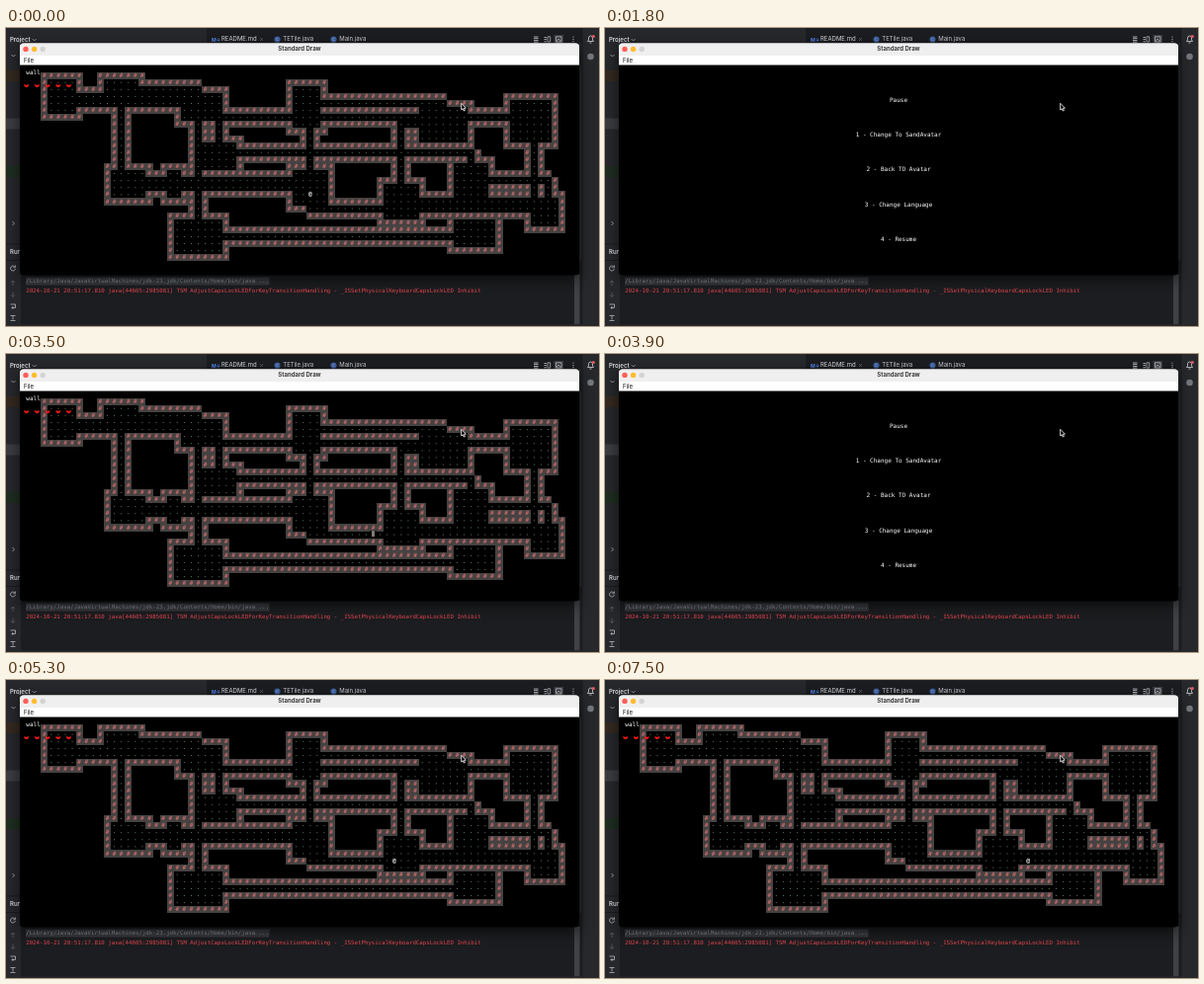
Write an HTML page with a canvas that moves like this. It is 600 by 302 pixels and loops after 7700 ms.

```html
<!DOCTYPE html>
<html lang="en">
<head>
<meta charset="utf-8">
<title>Standard Draw</title>
<style>
  html, body { margin: 0; width: 100%; height: 100%; overflow: hidden; background: #1c1d20; }
  canvas { display: block; width: 600px; height: 302px; }
</style>
</head>
<body>
<canvas id="stage" width="600" height="302"></canvas>
<script>
const ctx = document.getElementById('stage').getContext('2d');
const LOOP = 7700;
const COLS = 80, ROWS = 30;
const LEFT = 14, TOP = 37.5, TW = 7.08, TH = 7.1;
const MONO = '"DejaVu Sans Mono", monospace';
const SANS = 'Inter, sans-serif';
const ICON = '#b4b8bf', LABEL = '#ced0d6', BLUE = '#548af7';

// --- Dungeon: digging floor puts walls around it ---
const tiles = new Map();
const key = (c, r) => r * COLS + c;
const dig = (c, r) => tiles.set(key(c, r), 'floor');
function wall(c, r) {
  if (!tiles.has(key(c, r))) tiles.set(key(c, r), 'wall');
}

function room(c0, r0, c1, r1) {
  for (let r = r0 - 1; r <= r1 + 1; r++)
    for (let c = c0 - 1; c <= c1 + 1; c++)
      (c < c0 || c > c1 || r < r0 || r > r1 ? wall : dig)(c, r);
}

// Runs across to the first turn, then down to the next, and so on.
function tunnel(c, r, ...turns) {
  const step = () => {
    dig(c, r);
    wall(c - 1, r);
    wall(c + 1, r);
    wall(c, r - 1);
    wall(c, r + 1);
  };
  step();
  turns.forEach((end, i) => {
    const across = i % 2 === 0;
    while ((across ? c : r) !== end) {
      if (across) c += Math.sign(end - c); else r += Math.sign(end - r);
      step();
    }
  });
}

room(4, 2, 7, 6);
room(12, 2, 16, 5);
room(23, 4, 28, 7);
room(39, 3, 42, 8);
room(57, 6, 63, 10);
room(70, 5, 75, 10);
room(25, 11, 30, 14);
room(13, 15, 17, 18);
room(21, 15, 22, 18);
room(13, 16, 43, 17);
room(39, 15, 43, 19);
room(52, 17, 56, 21);
room(62, 14, 66, 18);
room(73, 19, 76, 22);
room(22, 22, 28, 26);
room(62, 22, 67, 25);

tunnel(12, 3, 25, 4);
tunnel(4, 4, 25, 26);
tunnel(4, 5, 28, 14);
tunnel(16, 5, 14, 18);
tunnel(25, 7, 75);
tunnel(39, 3, 41, 20, 76);
tunnel(42, 5, 60);
tunnel(57, 8, 54, 19, 76);
tunnel(25, 12, 64, 18);
tunnel(62, 16, 75, 22);
tunnel(73, 5, 73, 22);
tunnel(22, 24, 67);

// --- Timeline ---
const stepsDone = (t, start, every, count) =>
  Math.max(0, Math.min(count, Math.floor((t - start) / every) + 1));

function stateAt(t) {
  const first = stepsDone(t, 200, 150, 4);
  const right = Math.min(first, 2);
  return {
    col: 41 + right + stepsDone(t, 2300, 200, 7) + stepsDone(t, 4720, 240, 8),
    row: 18 + first - right,
    paused: (t >= 900 && t < 1900) || (t >= 3800 && t < 4400),
    sandy: t >= 1900 && t < 4400
  };
}

// --- Drawing helpers ---
function rect(x, y, w, h, color) {
  ctx.fillStyle = color;
  ctx.fillRect(x, y, w, h);
}
function text(str, x, y, font, color, align = 'left') {
  ctx.font = font;
  ctx.fillStyle = color;
  ctx.textAlign = align;
  ctx.textBaseline = 'middle';
  ctx.fillText(str, x, y);
}
function disc(x, y, radius, color) {
  ctx.fillStyle = color;
  ctx.beginPath();
  ctx.arc(x, y, radius, 0, Math.PI * 2);
  ctx.fill();
}
function stroke(path, x, y, color, width = 0.8) {
  ctx.save();
  ctx.translate(x, y);
  ctx.strokeStyle = color;
  ctx.lineWidth = width;
  ctx.stroke(new Path2D(path));
  ctx.restore();
}

// --- Desktop behind the game ---
function drawTabs() {
  rect(203, 0, 380, 15, '#1c1d20');
  text('Project', 4, 12, `600 6px ${SANS}`, '#dfe1e5');
  stroke('M-2 -1 L0 1 L2 -1', 28.7, 12, ICON, 0.7);
  text('M↓', 208, 12, `bold 5px ${SANS}`, BLUE);
  text('README.md', 218, 11.5, `6px ${SANS}`, '#dfe1e5');
  stroke('M-1.5 -1.5 L1.5 1.5 M1.5 -1.5 L-1.5 1.5', 258.5, 11.5, '#6f737a', 0.6);
  ['TETile.java', 'Main.java'].forEach((name, i) => {
    const x = 274.5 + i * 57;
    disc(x, 11.5, 3.1, '#3d5f9f');
    text('C', x, 11.7, `4px ${SANS}`, '#a9c4f5', 'center');
    text(name, x + 5.8, 11.5, `6px ${SANS}`, LABEL);
  });

  rect(554.5, 7, 9.5, 9, '#3c3e43');
  for (let i = 0; i < 4; i++) rect(534, 8.6 + i * 1.7, 4.5, 0.8, LABEL);
  for (let i = 0; i < 3; i++) {
    rect(544.5, 9 + i * 2.2, 2.4, 0.8, LABEL);
    disc(574, 9 + i * 2.3, 0.6, LABEL);
  }
  stroke('M0 0 h2.7 v5.2 h-2.7 z', 548, 8.8, LABEL, 0.7);
  stroke('M0 0 h5.5 v5.2 h-5.5 z M.5 4.7 l2 -2.5 l2.5 2.5', 556.5, 8.8, LABEL, 0.7);
}

function drawSides() {
  rect(583, 0, 17, 302, '#26282b');
  rect(582.5, 0, 0.8, 302, '#17181a');
  stroke('M-3 2.5 l1 -1.5 v-2 a2 2 0 0 1 4 0 v2 l1 1.5 z M-1 4 h2', 591.5, 11, LABEL);
  disc(594.3, 8.5, 1.6, '#e55765');
  disc(591.5, 29, 3.3, '#74777d');

  ['#33291f', '#3a3c40', '#1e2d21'].forEach((color, i) => rect(0, 43 + i * 48.5, 14, 11, color));
  stroke('M-2 -1 L0 1 L2 -1', 7.5, 28, ICON);
  stroke('M-1 -2 L1 0 L-1 2', 7.5, 198, ICON);
  rect(0, 218.5, 15, 0.8, '#17181a');
  text('Run', 4, 227, `600 6px ${SANS}`, '#dfe1e5');
  rect(0, 235, 15, 0.8, '#17181a');
}

function drawConsole() {
  rect(15, 236, 568, 66, '#1c1d20');
  stroke('M2 -1.5 a2.5 2.5 0 1 0 .5 2 M2.5 -3 v2.3 h-2.3', 7, 243.5, ICON);
  stroke('M0 2.5 v-5 M-2 -.5 L0 -2.5 L2 -.5', 7, 258.5, '#5a5d63');
  stroke('M0 -2.5 v5 M-2 .5 L0 2.5 L2 .5', 7, 270, '#5a5d63');
  stroke('M-2.5 -2 h5 v3.5 h-3.5 M.3 0 l-1.3 1.5 l1.3 1.5', 7, 282, ICON);
  stroke('M-2.5 -2.5 h5 M-2.5 2.5 h5 M0 -2 v3.5', 7, 294, ICON);

  const font = `5.75px ${MONO}`;
  rect(20, 252.6, 246.5, 8, '#37393d');
  text('/Library/Java/JavaVirtualMachines/jdk-23.jdk/Contents/Home/bin/java ...',
    20.2, 256.6, font, '#8a8d93');
  text('2024-10-21 20:51:17.810 java[44605:2985081] TSM AdjustCapsLockLEDForKeyTransitionHandling' +
    ' - _ISSetPhysicalKeyboardCapsLockLED Inhibit', 20.2, 266.4, font, '#e0464e');
  rect(575, 250, 5.5, 50.5, '#404144');
  rect(0, 300.5, 600, 1.5, '#26282b');
}

function drawWindow() {
  const panel = (y, h, corners, color) => {
    ctx.fillStyle = color;
    ctx.beginPath();
    ctx.roundRect(14, y, 566, h, corners);
    ctx.fill();
  };
  ctx.save();
  ctx.shadowColor = 'rgba(0,0,0,.6)';
  ctx.shadowBlur = 14;
  ctx.shadowOffsetY = 4;
  panel(15.4, 235, 4, '#000');
  ctx.restore();
  panel(15.4, 22.1, [4, 4, 0, 0], '#fff');
  panel(15.4, 12.6, [4, 4, 0, 0], '#f0eff0');

  ['#ff5f57', '#febc2e', '#d4d3d4'].forEach((color, i) => disc(20 + i * 8.6, 21.4, 2.7, color));
  text('Standard Draw', 297, 21.5, `bold 6px ${SANS}`, '#3a3a3a', 'center');
  text('File', 18, 33, `6px ${SANS}`, '#111');
}

// --- Game ---
function drawTile(kind, c, r) {
  const x = LEFT + c * TW, y = TOP + r * TH;
  const midX = x + TW / 2, midY = y + TH / 2;
  if (kind === 'floor') {
    rect(midX - 0.5, midY - 0.5, 1, 1, 'rgb(96,126,102)');
    return;
  }
  const x0 = Math.round(x), y0 = Math.round(y);
  rect(x0, y0, Math.round(x + TW) - x0, Math.round(y + TH) - y0, '#464242');
  text('#', midX, midY, `bold 6px ${MONO}`, 'rgb(196,106,106)', 'center');
}

function drawHeart(x, y) {
  ctx.fillStyle = '#f01818';
  ctx.beginPath();
  ctx.moveTo(x, y + 1.6);
  ctx.bezierCurveTo(x - 4.4, y - 0.4, x - 2, y - 2.4, x, y - 0.8);
  ctx.bezierCurveTo(x + 2, y - 2.4, x + 4.4, y - 0.4, x, y + 1.6);
  ctx.fill();
}

function drawMap() {
  tiles.forEach((kind, k) => drawTile(kind, k % COLS, Math.floor(k / COLS)));
  text('wall', 20.3, 45, `6px ${MONO}`, '#fff');
  for (let i = 0; i < 5; i++) drawHeart(20.7 + i * 10.7, 58.7);
}

function drawAvatar({ col, row, sandy }) {
  const x = LEFT + col * TW, y = TOP + row * TH;
  rect(x, y, TW, TH, '#000');
  const [glyph, size, color] = sandy ? ['▒', 5, '#fffbe0'] : ['@', 6.2, '#f0f0f0'];
  text(glyph, x + TW / 2, y + TH / 2, `bold ${size}px ${MONO}`, color, 'center');
}

function drawMenu() {
  ['Pause', '1 - Change To SandAvatar', '2 - Back TO Avatar', '3 - Change Language', '4 - Resume']
    .forEach((item, i) => text(item, 297, 73 + i * 35.45, `6px ${MONO}`, '#fff', 'center'));
}

function drawPointer() {
  const arrow = 'M0 0 v6.7 l1.5 -1.3 l1 2.3 l1.2 -.5 l-1 -2.2 l2 -.1 z';
  ctx.save();
  ctx.translate(460.7, 76.3);
  ctx.fillStyle = '#000';
  ctx.fill(new Path2D(arrow));
  ctx.restore();
  stroke(arrow, 460.7, 76.3, '#fff');
}

function layer(draw) {
  ctx.clearRect(0, 0, 600, 302);
  draw();
  const copy = document.createElement('canvas');
  copy.width = 600;
  copy.height = 302;
  copy.getContext('2d').drawImage(ctx.canvas, 0, 0);
  return copy;
}

const desktop = layer(() => {
  rect(0, 0, 600, 302, '#26282b');
  drawTabs();
  drawSides();
  drawConsole();
  drawWindow();
});
const map = layer(drawMap);

function frame(now) {
  const state = stateAt(now % LOOP);
  ctx.drawImage(desktop, 0, 0);
  if (state.paused) {
    drawMenu();
  } else {
    ctx.drawImage(map, 0, 0);
    drawAvatar(state);
  }
  drawPointer();
  requestAnimationFrame(frame);
}
frame(performance.now());
</script>
</body>
</html>
```
